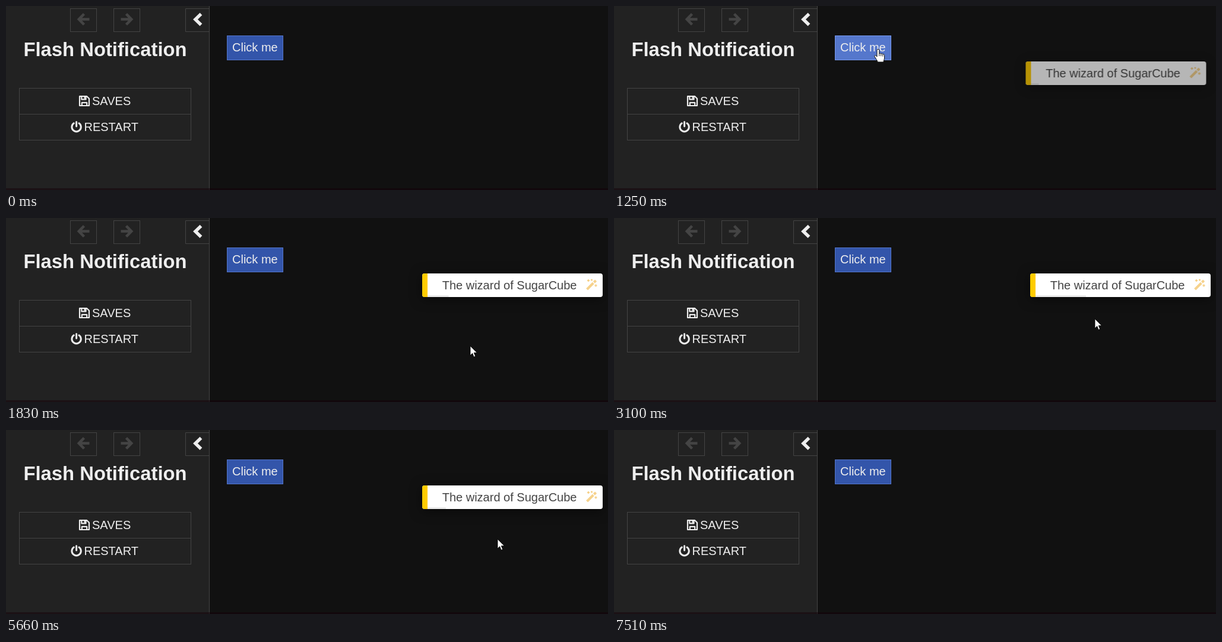
Write an HTML page that moves like this. It is 1014 px wide and 312 px high and loops after 7.78 s.

```html
<!DOCTYPE html>
<html lang="en">
<head>
<meta charset="utf-8">
<title>Flash Notification</title>
<style>
html, body { margin: 0; width: 100%; height: 100%; overflow: hidden; background: #111; }
svg { display: block; width: 1014px; height: 312px; }
text { font: 20px "Liberation Sans", Arial, sans-serif; fill: #eee; }
.title { font-size: 32.8px; font-weight: bold; text-anchor: middle; }
.box { fill: none; stroke: #444; }
.icon { fill: none; stroke: #eee; }
.off { stroke: #444; }

.button, .note, .bar, .cursor, .arrow, .hand, .click {
  animation: 7780ms linear infinite;
}
.button { animation-name: hover; }
.note   { animation-name: note; }
.bar    { animation-name: bar; }
.cursor { animation-name: move; }
.arrow  { animation-name: arrow; animation-timing-function: step-end; }
.hand   { animation-name: hand; animation-timing-function: step-end; }
.click  { animation-name: click; animation-timing-function: step-end; }

.note text { fill: #444; }
.card { fill: #fff; filter: drop-shadow(0 3px 10px rgba(0, 0, 0, .5)); }
.wand { fill: none; stroke: #f6d28c; }

@keyframes hover {
  0%, 9.8%       { fill: #35a; stroke: #57c; animation-timing-function: ease; }
  12.37%, 18.4%  { fill: #57c; stroke: #79e; animation-timing-function: ease; }
  20.97%, 100%   { fill: #35a; stroke: #57c; }
}
@keyframes note {
  0%             { opacity: 0; transform: translateX(-25px); }
  13.817%        { opacity: 0; transform: translateX(-25px); animation-timing-function: ease; }
  19.344%        { opacity: 1; transform: none; animation-timing-function: step-end; }
  88.046%, 100%  { opacity: 0; transform: none; }
}
/* Countdown strip: resets while the pointer is over the note. */
@keyframes bar {
  0%, 11.787%    { transform: scaleX(0); }
  56.67%         { transform: scaleX(136); }
  56.68%, 62.6%  { transform: scaleX(0); }
  76.59%         { transform: scaleX(42.5); }
  76.6%, 100%    { transform: scaleX(0); }
}
@keyframes move {
  0%                { transform: translate(925px, 330px); animation-timing-function: step-end; }
  3.085%            { transform: translate(925px, 300px); animation-timing-function: cubic-bezier(.35, .1, .4, 1); }
  11.054%, 17.995%  { transform: translate(445px, 73px); }
  19.02%            { transform: translate(505px, 116px); }
  20.05%            { transform: translate(588px, 163px); }
  21.08%            { transform: translate(680px, 198px); animation-timing-function: ease-out; }
  22.108%, 28.278%  { transform: translate(782px, 217px); animation-timing-function: ease-in-out; }
  32.134%, 55.141%  { transform: translate(810px, 171px); animation-timing-function: ease-out; }
  57.584%, 61.44%   { transform: translate(830px, 115px); animation-timing-function: ease-in-out; }
  65.553%, 73.907%  { transform: translate(828px, 185px); animation-timing-function: ease-in-out; }
  78.021%, 90.231%  { transform: translate(858px, 117px); animation-timing-function: ease-in; }
  96.53%, 100%      { transform: translate(950px, 330px); }
}
@keyframes arrow {
  0%, 18.4%, 62.6%, 88.046%, 100% { opacity: 1; }
  9.8%, 56.68%, 76.6%             { opacity: 0; }
}
@keyframes hand {
  0%, 18.4%, 62.6%, 88.046%, 100% { opacity: 0; }
  9.8%, 56.68%, 76.6%             { opacity: 1; }
}
@keyframes click {
  0%, 88.046%, 100% { opacity: 0; }
  87.275%           { opacity: 1; }
}
</style>
</head>
<body>
<svg viewBox="0 0 1014 312">
  <defs>
    <clipPath id="round"><rect x="701" y="94" width="304" height="40" rx="4"/></clipPath>
  </defs>

  <rect width="1014" height="312" fill="#111"/>
  <rect width="342" height="312" fill="#222"/>
  <path class="box" d="M342.5 0V312"/>

  <!-- Sidebar -->
  <rect class="box" x="108.5" y="4.5" width="44" height="39"/>
  <rect class="box" x="181.5" y="4.5" width="44" height="39"/>
  <path class="box" d="M342 4.5H302.5V43.5H342"/>
  <path class="icon off" stroke-width="4.6" d="M131.5 13.5L122.8 22.5L131.5 31.5M124 22.5H140.5"/>
  <path class="icon off" stroke-width="4.6" d="M202.5 13.5L211.2 22.5L202.5 31.5M210 22.5H193.5"/>
  <path class="icon" stroke-width="5.5" d="M328.5 13.5L319 22.7L328.5 31.9"/>
  <text class="title" x="167" y="85">Flash Notification</text>

  <rect class="box" x="22.5" y="139.5" width="289" height="44"/>
  <rect class="box" x="22.5" y="183.5" width="289" height="44"/>
  <g class="icon" stroke-width="2.2" stroke-linejoin="round">
    <path d="M124 153.2H136.2L140 157V169H124Z"/>
    <path d="M127.8 169V163.8H136.2V169"/>
    <path d="M127.3 153V158.4H134.5V153"/>
    <path d="M132.6 153V157.5"/>
  </g>
  <text x="145" y="168">SAVES</text>
  <path class="icon" stroke-width="3" stroke-linecap="round"
        d="M114.3 198.8A7.7 7.7 0 1 0 122.9 198.8M118.6 196.5V204"/>
  <text x="131.5" y="212">RESTART</text>

  <!-- Passage -->
  <rect class="button" x="372.5" y="50.5" width="94" height="41"/>
  <text x="381" y="77">Click me</text>
  <rect y="309" width="1014" height="3" fill="#140008" opacity=".5"/>

  <g class="note">
    <rect class="card" x="701" y="94" width="304" height="40" rx="4"/>
    <g clip-path="url(#round)">
      <rect x="701" y="94" width="9" height="40" fill="#fc0"/>
      <g transform="translate(710 131)"><rect class="bar" width="1" height="3" fill="#ebebeb"/></g>
    </g>
    <text x="734.7" y="121">The wizard of SugarCube</text>
    <g class="wand">
      <path stroke-width="4.2" d="M978.6 121L989.3 110.3M990.4 109.2L993.6 106"/>
      <path stroke-width="1.8" d="M981 104v4M979 106h4M986.5 103.5v3M985 105h3M993.5 112.5v4M991.5 114.5h4"/>
    </g>
  </g>

  <g class="cursor">
    <circle class="click" r="15" fill="#ff0" opacity="0" fill-opacity=".6"/>
    <path class="arrow" fill="#fff" stroke="#000" stroke-width=".8"
          d="M0 0V16L3.7 12.5L6 18.5L8.7 17.4L6.3 11.6H11.4Z"/>
    <g class="hand" stroke="#111" stroke-linejoin="round">
      <path fill="#fff" d="M-2 13V2.2a1.9 1.9 0 0 1 3.8 0V8a1.6 1.6 0 0 1 3 .6a1.6 1.6 0 0 1 3 .8a1.5 1.5 0 0 1 2.7 1V15c0 3-1.5 4-1.5 7H-1c0-2-2-4-3-6l-2-3.3c-.8-1.7 1-2.7 2.2-1.4z"/>
      <path fill="none" d="M1.8 8v4M4.8 8.6v3.6M7.8 9.4v3.2"/>
    </g>
  </g>
</svg>
</body>
</html>
```
